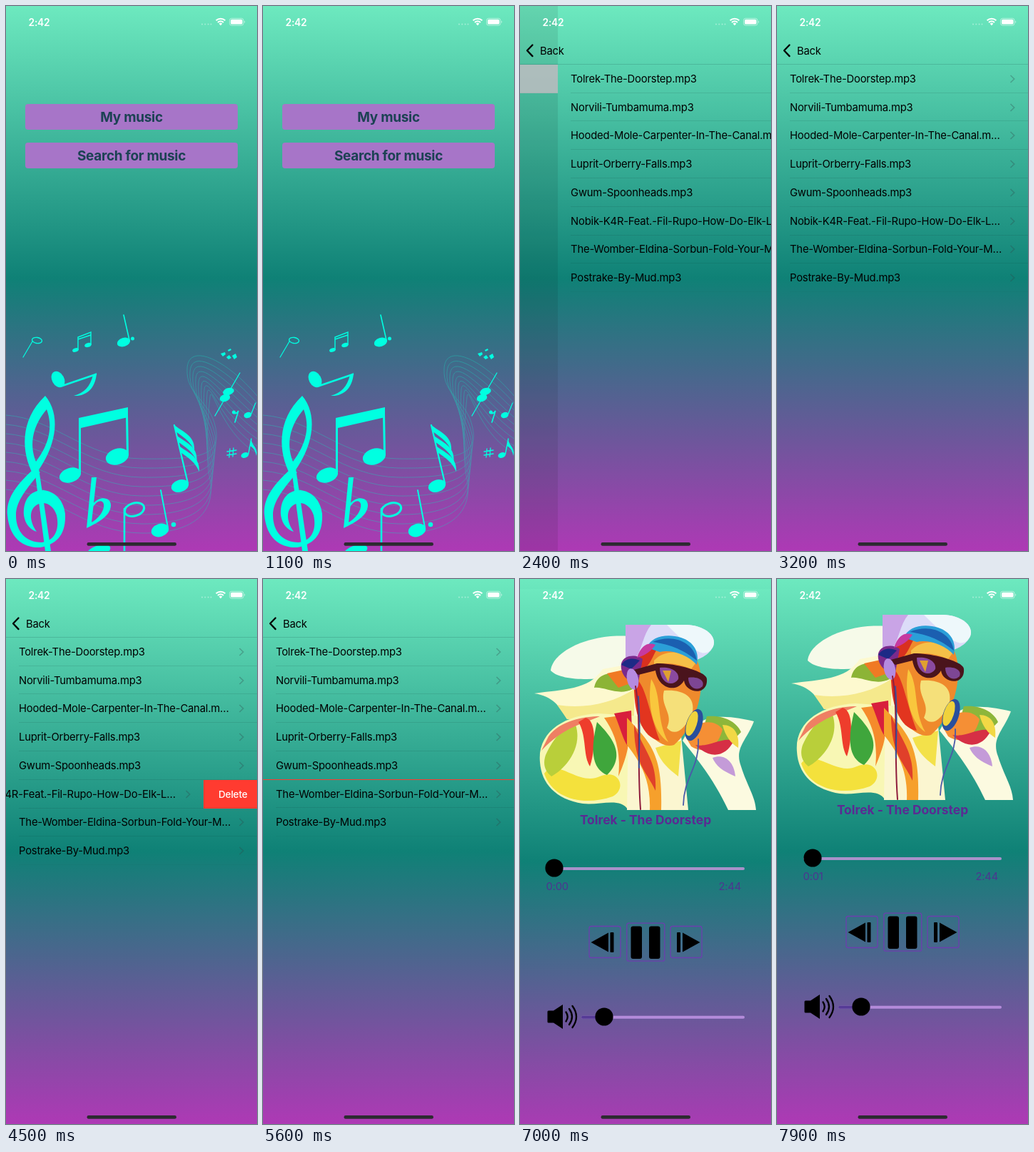
Animation of 352 by 762 pixels, one loop 8 s. Source, as an HTML page:

```html
<!DOCTYPE html>
<html lang="en">
<head>
<meta charset="utf-8">
<title>Music player</title>
<style>
html, body { margin: 0; width: 100%; height: 100%; overflow: hidden; }
body { position: relative; font: 14.8px/1 Inter, "Liberation Sans", sans-serif; letter-spacing: -.2px; color: #000; }
#stage { position: absolute; left: 0; top: 0; width: 352px; height: 762px; overflow: hidden; }
.screen, .screen > svg, .dim, .top { position: absolute; left: 0; top: 0; width: 352px; height: 762px; overflow: hidden; }
.screen { background: linear-gradient(#6de9bf, #0f8176 50%, #ae39b5); }
.dim { background: #000; opacity: 0; }
.btn { position: absolute; left: 27px; width: 298px; height: 36.5px; border-radius: 4px; background: #a775c8; color: #1c4253;
  font-size: 19px; font-weight: 700; line-height: 37px; text-align: center; letter-spacing: -.3px; }
.row { position: absolute; left: 0; width: 352px; height: 39.72px; overflow: hidden; }
.row::after { content: ""; position: absolute; left: 18px; right: 0; bottom: 0; height: 1px; background: rgba(20,60,60,.13); }
.row:last-child::after { opacity: .4; }
.cell { position: absolute; left: 0; top: 0; width: 352px; height: 39.72px; }
.cell span { position: absolute; left: 18px; line-height: 41px; white-space: nowrap; }
.cell svg { position: absolute; left: 326px; top: 14px; }
.red { position: absolute; left: 352px; top: 0; width: 352px; height: 100%; z-index: 1; background: #ff3b30; color: #fff; overflow: hidden; }
.red b { position: absolute; left: 21px; top: 0; font-size: 13.6px; font-weight: 500; line-height: 40px; }
.line { position: absolute; left: 0; top: 81px; width: 352px; height: 1px; background: rgba(20,60,60,.18); }
</style>
</head>
<body>
<div id="stage">
  <div class="screen" id="home">
    <svg id="notes" viewBox="0 0 352 762"></svg>
    <div class="btn" style="top:136.5px">My music</div>
    <div class="btn" style="top:190.5px">Search for music</div>
    <div class="dim"></div>
  </div>
  <div class="screen" id="folder"><div class="line"></div><div class="rows"></div><div class="dim"></div></div>
  <div class="screen" id="list"><div class="line"></div><div class="rows"></div></div>
  <svg class="top" id="nav" viewBox="0 0 352 762">
    <path d="M17.5 54.5L10 62.3l7.5 7.8" fill="none" stroke="#000" stroke-width="2.3" stroke-linecap="round" stroke-linejoin="round"/>
    <text x="28" y="67.8">Back</text>
  </svg>
  <div class="screen" id="player"><svg id="deck" viewBox="0 0 352 762"></svg></div>
  <svg class="top" viewBox="0 0 352 762" fill="#fff">
    <text x="31.5" y="27.6" font-size="13.8" font-weight="600">2:42</text>
    <g opacity=".4"><circle cx="275" cy="25.5" r="1"/><circle cx="279.3" cy="25.5" r="1"/><circle cx="283.6" cy="25.5" r="1"/><circle cx="287.5" cy="25.5" r="1"/></g>
    <g fill="none" stroke="#fff" stroke-width="2"><path d="M294.6 20.3a9 9 0 0 1 12.8 0M297 23a5.6 5.6 0 0 1 8 0"/></g>
    <path d="M301 27.3l-2.3-2.5a3.2 3.2 0 0 1 4.6 0z"/>
    <rect x="313.5" y="17.3" width="19.5" height="9.8" rx="2.8" fill="none" stroke="#fff" stroke-opacity=".5"/>
    <rect x="315" y="18.8" width="16.5" height="6.8" rx="1.6"/>
    <path d="M334.3 20.5q2 1.7 0 3.4z" opacity=".6"/>
    <rect x="113.5" y="750" width="125.5" height="4.8" rx="2.4" fill="#2c2a30"/>
  </svg>
</div>
<script>
const $ = s => document.querySelector(s);
const LOOP = 8000, ROW = 39.72, TOP = 82, W = 352, H = 762;
const songs = [
  "Tolrek-The-Doorstep.mp3", "Norvili-Tumbamuma.mp3", "Hooded-Mole-Carpenter-In-The-Canal.m…",
  "Luprit-Orberry-Falls.mp3", "Gwum-Spoonheads.mp3", "Nobik-K4R-Feat.-Fil-Rupo-How-Do-Elk-L…",
  "The-Womber-Eldina-Sorbun-Fold-Your-M…", "Postrake-By-Mud.mp3"
];
const CUT = 5;

/* ---- drawing helpers ---- */
const path = (d, fill) => `<path d="${d}" fill="${fill}"/>`;
const line = (d, color, w) => `<path d="${d}" fill="none" stroke="${color}" stroke-width="${w}" stroke-linecap="round"/>`;
const oval = (x, y, rx, ry, rot, fill) =>
  `<ellipse cx="${x}" cy="${y}" rx="${rx}" ry="${ry}" transform="rotate(${rot} ${x} ${y})" fill="${fill}"/>`;
const ring = (x, y, rx, ry, rot, color, w) =>
  `<ellipse cx="${x}" cy="${y}" rx="${rx}" ry="${ry}" transform="rotate(${rot} ${x} ${y})" fill="none" stroke="${color}" stroke-width="${w}"/>`;
const bar = (x, y, w, h, r, fill) => `<rect x="${x}" y="${y}" width="${w}" height="${h}" rx="${r}" fill="${fill}"/>`;

function drawNotes() {
  const c = "#00ffe1";
  const head = (x, y, rx, ry) => oval(x, y, rx, ry, -18, c);
  const stroke = (d, w) => line(d, c, w);
  let s = '<g opacity=".55">';
  for (let i = 0; i < 9; i++) {
    s += line(`M0 ${572 + 13 * i}C70 ${577 + 13 * i} 110 ${632 + 13 * i} 190 ${633 + 13 * i}` +
      `S${302 - i} ${630 + 9 * i} ${294 - i} ${590 + 9 * i}S${252 + 4 * i} ${545 + 3 * i} ${254 + 4 * i} ${507 + 5 * i}` +
      `S${310 - i} ${495 + 13 * i} 352 ${545 + 10 * i}`, "#19d6bd", .7);
  }
  s += "</g>";
  // treble clef
  s += `<path fill-rule="evenodd" fill="${c}" d="M55 545C18 580 22 625 38 655L47 647C72 610 76 570 55 545ZM57 564C38 586 32 612 42 637C61 612 66 588 57 564Z"/>`;
  s += path("M38 648C12 672 0 690 2 712C5 745 25 758 48 757C75 752 84 735 83 710C80 685 62 676 48 677C30 680 24 695 25 712C27 725 34 732 43 735C34 722 32 708 40 700C50 690 66 695 71 712C76 735 66 748 50 750C28 750 14 735 14 712C14 695 24 680 48 652Z", c);
  s += path("M39 640L45 640L63 762L55 762Z", c);
  // large beamed pair
  s += path("M102 576L171 561V575L105 590V652H102ZM168 570H171L172 628H169Z", c) + head(90, 656, 15.5, 10) + head(156, 630, 16.5, 11);
  // tilted eighth
  s += oval(73, 522, 8.5, 12, -28, c) + stroke("M79 531L126 515", 2.5) + path("M127 513C126 532 115 546 95 545C110 541 118 532 122 516Z", c);
  // small notes along the top
  s += head(165, 470, 9.5, 6) + stroke("M173 467L165 432", 1.6) + oval(177.5, 465, 2.5, 2.5, 0, c);
  s += head(97.5, 481, 4.5, 2.7) + head(115, 474, 5, 3) + stroke("M101 480V463L119 456V473M101 466L119 460", 1.4);
  s += ring(43.5, 467.5, 7, 4, 10, c, 1.4) + stroke("M37 469L24 491", 1.2);
  // triple-flag note
  s += head(244, 671, 12.5, 8.5) + stroke("M255 667L236 586", 2.2);
  for (let i = 0; i < 3; i++)
    s += `<g transform="translate(${i * 3.4} ${i * 14.5})">${path("M235 585C246 595 266 600 264 622C259 609 248 602 238 595Z", c)}</g>`;
  // flat sign, half notes, dotted quarter
  s += path("M120 659L127 659L120 722C134 714 140 700 136 694C132 689 124 695 121 703L122 696C132 684 148 687 147 699C146 713 130 722 113 730Z", c);
  s += ring(180, 704, 14, 9, -16, c, 3) + stroke("M166 703V762", 2.6) + head(130, 762, 17, 8);
  s += head(216, 733, 12.5, 9) + stroke("M227 729L217 677", 2) + oval(235, 725, 3.3, 3.3, 0, c);
  // right-hand cluster
  s += path("M301 486l6-2 1 3-4 3zM309 491l4-3 3 4-4 2zM317 489l5-3 2 5-4 3zM311 481l4-2 1 2-4 2z", c);
  s += head(312, 539, 8, 5) + head(307, 548, 7.5, 5) + stroke("M328 513L293 573", 1.3);
  s += oval(319.5, 568, 2.5, 2.5, 0, c) + stroke("M319 569q4 2 7-3l-5 16", 1.6);
  s += head(339, 572, 5.5, 4) + stroke("M344 570L350 555", 1.3);
  s += stroke("M314 619l-1 12M319 618l-1 12M310 623l13-2M310 628l13-2", 1.3);
  s += head(335, 628, 5.5, 3.7) + stroke("M340 626L344 605", 1.4) + path("M344 605C344 615 354 616 351 629C350 621 346 617 342 615Z", c);
  $("#notes").innerHTML = s;
}

// colourful listener without a face, in flat patches
function portrait() {
  const p = (fill, d) => path(d, fill);
  return p("#f6fae9", "M43 114C46 86 100 62 152 66V120C124 126 60 132 43 114Z") +
    p("#dcdcf8", "M148 50H230C262 50 278 68 270 82C258 106 200 112 148 110Z") +
    p("#c9a4e6", "M148 50H184C172 64 172 84 160 100H148Z") +
    p("#eef8fb", "M206 50H230C262 50 278 68 270 82C258 100 240 84 206 50Z") +
    p("#fdf9cf", "M20 146C60 140 96 142 116 112L160 104L166 182L66 182C56 164 46 150 20 146Z") +
    p("#f5e98c", "M52 162C90 168 130 160 160 140V182H66Z") +
    p("#8cb436", "M104 138C108 118 124 116 146 118L158 140C138 150 118 136 104 138Z") +
    p("#f07a24", "M122 118L150 112L160 130L138 138Z") +
    p("#f8f7b4", "M28 242C24 200 62 176 110 174L170 178V309H152C140 290 112 303 88 300C50 294 30 272 28 242Z") +
    p("#f4e13c", "M34 258C50 234 82 276 112 262C140 250 150 280 130 290C90 304 46 294 34 258Z") +
    p("#b9cf3a", "M36 232C48 206 62 192 78 190C88 220 66 250 44 262C34 254 32 244 36 232Z") +
    p("#ef7f63", "M40 206C56 184 90 178 112 178C90 188 62 192 30 226Z") +
    p("#ee3d2c", "M92 180C110 184 104 232 98 248C88 232 94 206 82 186Z") +
    p("#3fa63c", "M108 186C128 206 150 232 122 260C98 250 100 220 108 186Z") +
    p("#f58b2c", "M118 180L150 176C158 214 148 238 138 262C142 224 132 200 118 180Z") +
    p("#d81f3c", "M132 174L156 170L158 226C146 220 142 196 132 174Z") +
    p("#fbf6d0", "M152 186L226 205L236 309H150Z") +
    p("#f6a02c", "M150 180C184 216 200 230 198 309H182C184 262 164 236 150 218Z") +
    p("#e0402a", "M160 190C176 230 192 240 190 282C178 256 160 246 160 190Z") +
    p("#f3e14a", "M190 222L226 212L222 262C206 250 196 240 190 222Z") +
    p("#fcfae0", "M228 212C250 168 296 178 328 185C318 212 300 222 310 248C318 274 330 290 331 309H292C276 276 262 254 228 212Z") +
    p("#8db63a", "M262 178C280 176 302 182 310 200C290 222 270 226 252 214Z") +
    p("#f58f35", "M232 206C244 184 272 180 284 196C278 222 258 232 240 220Z") +
    p("#d62f45", "M246 218C264 222 284 206 300 212C288 236 266 238 246 218Z") +
    p("#c49bd8", "M270 236C286 230 300 240 302 262C288 256 276 250 270 236Z") +
    p("#f2d845", "M284 190C300 190 308 202 306 222C296 216 288 206 284 190Z") +
    p("#ef8a2c", "M163 106C170 78 238 70 250 104C262 140 246 192 216 218C196 224 174 200 166 172Z") +
    p("#e2351f", "M160 124C176 130 180 170 196 212C172 208 158 176 160 124Z") +
    p("#f9c73d", "M184 126C200 150 190 182 208 214C186 200 178 160 184 126Z") +
    p("#f5e07a", "M202 142C228 140 246 150 242 172C230 200 216 206 206 194C216 174 196 164 202 142Z") +
    p("#f6c048", "M188 100C202 84 232 84 246 104L240 112C222 104 204 102 188 106Z") +
    p("#d9301f", "M166 98C172 84 184 82 192 84C186 94 184 104 172 114Z") +
    p("#7a2a8c", "M142 104C146 90 166 92 172 98L166 130C150 132 140 118 142 104Z") +
    p("#1d2a86", "M142 106C148 96 160 96 168 100L156 112Z") +
    p("#2b9fd8", "M178 82C184 66 206 62 226 68C244 74 252 88 248 106C236 92 212 84 196 88Z") +
    p("#1b5fb0", "M186 74C214 62 244 74 248 100C230 86 214 78 186 74Z") +
    p("#c63aa0", "M164 96C170 78 180 74 190 78C184 86 178 92 164 96Z") +
    p("#4a141c", "M156 114L192 104C222 104 262 116 262 126C264 150 232 146 230 128C220 146 194 140 190 114L166 120Z") +
    p("#8a4aa0", "M196 110C212 108 224 116 222 126C214 138 196 132 196 110Z") +
    p("#e0a030", "M200 114L212 114L208 130Z") +
    p("#7d4694", "M236 124C246 122 260 126 256 136C248 144 236 138 236 124Z") +
    oval(158, 126, 8, 15, -12, "#b58be0") + oval(244, 190, 11, 23, 18, "#2a4f9c") + oval(241, 188, 7, 18, 18, "#f0d23c") +
    line("M162 136C170 180 164 240 169 308", "#8f1d3c", 2) + line("M166 150C170 200 166 240 167 250", "#2455a8", 1.6) +
    line("M250 210C252 250 230 262 229 302", "#4a5aa8", 1.8);
}

function drawPlayer() {
  const ink = "#5b2a93", rim = "#6c3fae";
  const frame = (x, y, w, h) => `<rect x="${x}" y="${y}" width="${w}" height="${h}" rx="3" fill="none" stroke="${rim}" stroke-width="1.3"/>`;
  $("#deck").innerHTML = portrait() +
    `<text x="176" y="328.6" text-anchor="middle" font-size="17.4" font-weight="700" letter-spacing="0" fill="${ink}">Tolrek - The Doorstep</text>` +
    bar(37, 389, 278, 4, 2, "#a892ca") + '<circle id="knob" cx="48" cy="390" r="12.6"/>' +
    `<text id="time" x="36.5" y="421" fill="#4d3690">0:00</text><text x="310" y="421" text-anchor="end" fill="#4d3690">2:44</text>` +
    frame(97, 471.5, 44, 44) + frame(149.8, 467.2, 53, 53) + frame(211, 471.5, 44, 44) +
    path("M99.5 494L124 480.5V507.5ZM228 480.5L252.5 494L228 507.5Z", "#000") +
    bar(126.5, 480, 5, 28, 1, "#000") + bar(220, 480, 5, 28, 1, "#000") +
    bar(155.5, 471.5, 15.5, 45.5, 3, "#000") + bar(181, 471.5, 15.5, 45.5, 3, "#000") +
    path("M40 589.5H47L60 581V615L47 606.5H40Q38.5 606.5 38.5 605V591Q38.5 589.5 40 589.5Z", "#000") +
    line("M64.5 591.5q4.5 6.5 0 13M69 587q8 11 0 22M73.5 583q11 15 0 30", "#000", 2.3) +
    bar(86, 596.7, 229, 4, 2, "#b48bda") + bar(86, 596.7, 32, 4, 2, "#553a96") + '<circle cx="118" cy="598" r="12.6"/>';
}

const rowHtml = (name, i) => `<div class="row" style="top:${TOP + ROW * i}px"><div class="cell"><span>${name}</span>` +
  '<svg width="8" height="12"><path d="M1.5 1L6.7 6L1.5 11" fill="none" stroke="rgba(50,70,75,.32)" stroke-width="1.6"/></svg></div>' +
  (i === CUT ? '<div class="red"><b>Delete</b></div>' : "") + "</div>";

drawNotes();
drawPlayer();
$("#folder .rows").innerHTML = rowHtml("Music", 0);
$("#list .rows").innerHTML = songs.map(rowHtml).join("");

/* ---- motion ---- */
const rows = [...document.querySelectorAll("#list .row")];
const folderRow = $("#folder .row"), cutCell = rows[CUT].firstChild, red = $(".red");
const clamp = v => Math.max(0, Math.min(1, v));
const span = (t, a, b) => clamp((t - a) / (b - a));
const inOut = u => u * u * (3 - 2 * u);
const out = u => 1 - (1 - u) ** 3;

// cubic-bezier(.32,.72,0,1)
function sheet(u) {
  let lo = 0, hi = 1;
  for (let k = 0; k < 24; k++) {
    const s = (lo + hi) / 2;
    if (.96 * (1 - s) ** 2 * s + s ** 3 < u) lo = s; else hi = s;
  }
  return 2.16 * (1 - lo) ** 2 * lo + 3 * (1 - lo) * lo * lo + lo ** 3;
}
const moveX = (el, x) => el.style.transform = `translateX(${x}px)`;
const glow = (el, on) => el.style.background = on ? "rgba(207,207,212,.85)" : "";

function push(from, to, u) {
  moveX(from, -.3 * W * u);
  moveX(to, W * (1 - u));
  from.querySelector(".dim").style.opacity = .1 * u;
}

function draw(t) {
  const p1 = sheet(span(t, 1150, 1650)), p2 = sheet(span(t, 2250, 2750));
  push($("#home"), $("#folder"), p1);
  if (p2 > 0) push($("#folder"), $("#list"), p2);
  else { moveX($("#list"), W); $("#folder .dim").style.opacity = 0; }
  $("#nav").style.opacity = p1;
  glow(folderRow, t >= 2150 && t < 2800);

  // swipe, then delete; whole pixels keep the last hairline crisp
  const slide = 75 * out(span(t, 3900, 4400)) + 277 * inOut(span(t, 4850, 5200));
  moveX(cutCell, -slide);
  moveX(red, -slide);
  const shut = out(span(t, 5100, 5600));
  rows[CUT].style.display = t < 5700 ? "" : "none";
  rows[CUT].style.height = Math.max(1, Math.round(ROW * (1 - shut))) + "px";
  rows[CUT].style.top = Math.round(TOP + ROW * CUT - shut) + "px";
  for (let i = CUT + 1; i < rows.length; i++) rows[i].style.top = TOP + ROW * (i - shut) + "px";

  // player rises
  glow(rows[0], t >= 6600);
  $("#player").style.transform = `translateY(${Math.round(H * (1 - sheet(span(t, 6680.5, 7180.5))))}px)`;
  const sec = t >= 7700 ? 1 : 0;
  $("#time").textContent = "0:0" + sec;
  $("#knob").setAttribute("cx", 48 + 2 * sec);
}

const start = performance.now();
function tick() {
  draw((performance.now() - start) % LOOP);
  requestAnimationFrame(tick);
}
tick();
</script>
</body>
</html>
```
